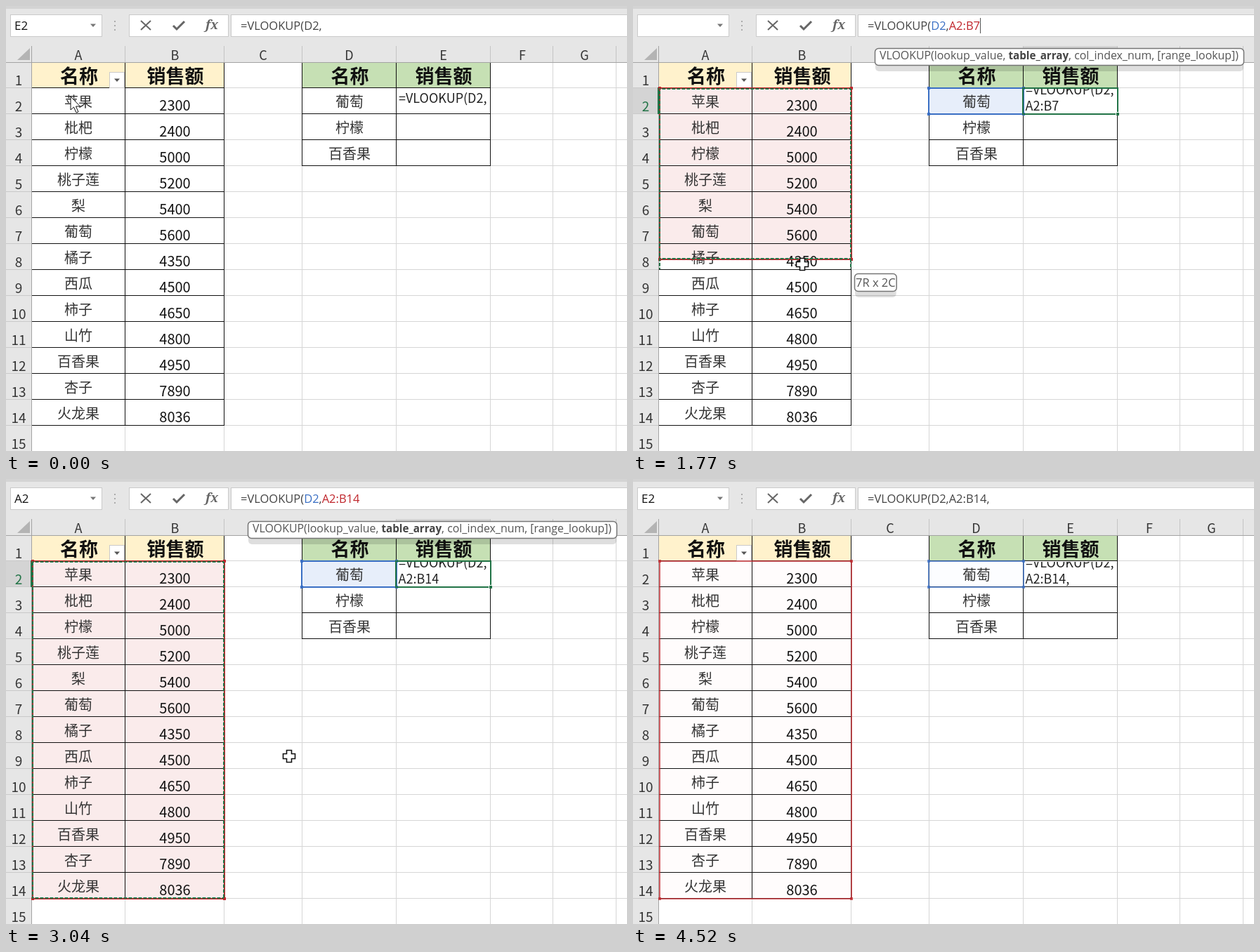
Animation of 884x634 px, one loop 4560 ms. Source, as an HTML page with a canvas:

```html
<!DOCTYPE html>
<html lang="zh">
<head>
<meta charset="utf-8">
<style>
html, body { margin: 0; width: 100%; height: 100%; overflow: hidden; background: #fff; }
canvas { display: block; }
</style>
</head>
<body>
<canvas id="stage" width="884" height="634"></canvas>
<script>
const c = document.getElementById('stage').getContext('2d');
const LOOP = 4560, FOCUS = 300, CLICK = 1000, DRAG = 1460, RELEASE = 2600, COMMA = 3660, BLUR = 4330;
const GREEN = '#217346', RED = '#c0272d', BLUE = '#3a6fc4';
const cjk = '"Noto Sans CJK SC", "Noto Sans CJK", sans-serif';
const ui = '"Open Sans", "Noto Sans", sans-serif';
const colX = [36, 169, 310, 421, 555, 689, 778, 868];
const rowY = r => 79 + 37 * (r - 1);
const fruits = '苹果 枇杷 柠檬 桃子莲 梨 葡萄 橘子 西瓜 柿子 山竹 百香果 杏子 火龙果'.split(' ');
const sales = [2300, 2400, 5000, 5200, 5400, 5600, 4350, 4500, 4650, 4800, 4950, 7890, 8036];

// Pointer path: time, x, y
const path = [
  [0, 92, 129], [50, 92, 129], [90, 112, 131], [DRAG, 112, 131], [1580, 172, 222],
  [1713, 238, 338], [1770, 241, 368], [2060, 244, 488], [2150, 245, 511], [2350, 245, 576],
  [RELEASE, 245, 580], [3000, 403, 395], [3090, 403, 395], [3500, 450, 382],
  [3920, 450, 382], [4280, 520, 665], [LOOP, 520, 665]
];

const clamp = v => Math.max(0, Math.min(1, v));

function pointer(t) {
  let i = 0;
  while (i < path.length - 2 && t >= path[i + 1][0]) i++;
  const [t0, x0, y0] = path[i], [t1, x1, y1] = path[i + 1];
  const k = clamp((t - t0) / (t1 - t0));
  return [x0 + (x1 - x0) * k, y0 + (y1 - y0) * k];
}

// Selected cell under the pointer: last column and row
function picked(t) {
  const [x, y] = pointer(Math.max(DRAG, Math.min(t, RELEASE)));
  return { col: x > 169 ? 2 : 1, row: Math.max(2, Math.min(14, Math.floor((y - rowY(1)) / 37) + 1)) };
}

// The drawn edge trails the picked cell by a short moving average
function edge(t) {
  let x = 0, y = 0;
  for (let i = 0; i < 20; i++) {
    const p = picked(t - i * 5);
    x += colX[p.col] / 20;
    y += rowY(p.row + 1) / 20;
  }
  return [Math.round(x), Math.round(y)];
}

function box(x, y, w, h, fill) {
  c.fillStyle = fill;
  c.fillRect(x, y, w, h);
}
const hLine = (x0, x1, y, color) => box(x0, y, x1 - x0 + 1, 1, color);
const vLine = (x, y0, y1, color) => box(x, y0, 1, y1 - y0 + 1, color);

function text(s, x, y, font, color, align = 'left') {
  c.font = font;
  c.fillStyle = color;
  c.textAlign = align;
  c.fillText(s, x, y);
  return x + c.measureText(s).width;
}

function stroke(points, color, width, close) {
  c.beginPath();
  points.forEach(([x, y]) => c.lineTo(x, y));
  if (close) c.closePath();
  c.strokeStyle = color;
  c.lineWidth = width;
  c.stroke();
}

function shape(points, fill) {
  c.beginPath();
  points.forEach(([x, y]) => c.lineTo(x, y));
  c.closePath();
  c.fillStyle = fill;
  c.fill();
}

function withAlpha(a, draw) {
  c.save();
  c.globalAlpha = a;
  draw();
  c.restore();
}

function frameBox(x, y, w, h) {
  box(x, y, w, h, '#fff');
  c.strokeStyle = '#cacaca';
  c.lineWidth = 1;
  c.strokeRect(x + .5, y + .5, w, h);
}

function rangeName(t) {
  if (t < CLICK) return '';
  const p = picked(t - 70);
  return p.col < 2 && p.row < 3 ? 'A2' : 'A2:' + 'AB'[p.col - 1] + p.row;
}

function topBar(t, focused) {
  box(0, 0, 884, 80, '#e6e6e6');
  box(0, 0, 884, 4, '#d4d4d4');
  frameBox(6, 12, 130, 31);
  frameBox(175, 12, 141, 31);
  frameBox(320, 12, 570, 31);
  shape([[120, 25.5], [128, 25.5], [124, 30]], '#777');
  for (const y of [21, 27, 33]) box(154, y, 2, 2, '#aaa');
  stroke([[192, 21], [206, 34]], '#666', 2);
  stroke([[206, 21], [192, 34]], '#666', 2);
  stroke([[238, 28], [243, 33], [254, 22]], '#666', 3);
  text('fx', 284, 33, 'italic bold 18px "Noto Serif", serif', '#666');

  const p = picked(t);
  const dragging = t > DRAG && t < RELEASE && (p.col > 1 || p.row > 2);
  const name = t < CLICK || t >= COMMA ? 'E2' : dragging ? '' : 'A2';
  text(name, 12, 34, '17px ' + ui, '#111');

  const font = '16.5px ' + ui, dark = '#444';
  let x = text('=VLOOKUP(', 334, 34, font, dark);
  x = text('D2', x, 34, font, focused ? BLUE : dark);
  x = text(',', x, 34, font, dark);
  x = text(rangeName(t), x, 34, font, focused ? RED : dark);
  if (t >= COMMA) text(',', x, 34, font, dark);
  if (focused && t < COMMA - 100 && (t + 820) % 1060 < 530) vLine(Math.round(x), 17, 38, '#555');
}

function headers(focused) {
  box(0, 80, 36, 554, '#e6e6e6');
  if (focused) {
    box(556, 57, 133, 23, '#d4d4d4');
    box(0, 117, 36, 36, '#d4d4d4');
  }
  shape([[34, 60], [34, 77], [16, 77]], '#b4b4b4');
  [103, 240.5, 366, 488.5, 622.5, 735, 823.5].forEach((x, i) =>
    text('ABCDEFG'[i], x, 77, '18px ' + cjk, '#333', 'center'));
  colX.forEach(x => vLine(x, 57, 80, '#c4c4c4'));
  for (let r = 1; r <= 15; r++) {
    hLine(0, 36, rowY(r + 1), '#c9c9c9');
    text(r, 18, rowY(r) + 34, '19px ' + cjk, focused && r === 2 ? GREEN : '#333', 'center');
  }
  hLine(0, 884, 80, '#a3a3a3');
  vLine(36, 57, 634, '#a3a3a3');
  if (focused) box(35, 116, 2, 38, GREEN);
}

function grid() {
  colX.slice(1).forEach(x => vLine(x, 81, 634, '#d6d6d6'));
  for (let r = 2; r <= 16; r++) hLine(37, 884, rowY(r), '#d6d6d6');
}

function tables(t) {
  box(37, 81, 273, 35, '#fff2cc');
  box(422, 81, 267, 35, '#c6e0b4');
  for (let r = 2; r <= 15; r++) hLine(37, 310, rowY(r), '#111');
  for (const x of [169, 310]) vLine(x, 81, rowY(15), '#111');
  for (let r = 2; r <= 5; r++) hLine(421, 689, rowY(r), '#111');
  for (const x of [421, 555, 689]) vLine(x, 81, rowY(5), '#111');

  for (const [s, x] of [['名称', 104], ['销售额', 241], ['名称', 489.5], ['销售额', 623]])
    text(s, x, 110, 'bold 27px ' + cjk, '#111', 'center');
  const small = '300 20px ' + cjk;
  fruits.forEach((s, i) => {
    text(s, 103, 144 + 37 * i, small, '#333', 'center');
    text(sales[i], 240.5, 149 + 37 * i, small, '#111', 'center');
  });
  ['葡萄', '柠檬', '百香果'].forEach((s, i) => text(s, 489, 144 + 37 * i, small, '#333', 'center'));

  frameBox(147, 94, 21, 22);
  shape([[154, 103.5], [162, 103.5], [158, 108]], '#555');

  c.save();
  c.beginPath();
  c.rect(556, 118, 133, 35);
  c.clip();
  const font = '18px ' + cjk;
  text('=VLOOKUP(D2,', 559, t < CLICK ? 138 : 126, font, '#222');
  if (t >= CLICK) text(rangeName(t) + (t >= COMMA ? ',' : ''), 558.5, 149, font, '#222');
  c.restore();
}

function outline(x0, y0, x1, y1, color) {
  c.strokeStyle = color;
  c.lineWidth = 2;
  c.strokeRect(x0, y0, x1 - x0, y1 - y0);
  for (const x of [x0, x1]) for (const y of [y0, y1]) box(x - 2, y - 2, 4, 4, color);
}

// Marching dashes; the sides already reach the picked row
function ants(t, x1, y1) {
  const bottom = rowY(picked(t).row + 1);
  const sides = [[[38, bottom], [38, 118]], [[37, 118], [x1, 118]],
    [[x1, 118], [x1, bottom]], [[x1, y1], [37, y1]]];
  c.save();
  c.setLineDash([5, 2]);
  c.lineDashOffset = -t / 45;
  sides.forEach(side => stroke(side, GREEN, 2));
  c.restore();
}

function bubble(x, y, w, h) {
  c.beginPath();
  c.roundRect(x + 1, y + 8, w - 2, h, 5);
  c.fillStyle = 'rgba(0,0,0,.13)';
  c.fill();
  c.beginPath();
  c.roundRect(x + .5, y + .5, w - 1, h - 1, 5);
  c.fillStyle = '#fff';
  c.fill();
  c.strokeStyle = '#767676';
  c.lineWidth = 1.5;
  c.stroke();
}

function hint(t) {
  const late = t >= COMMA;
  bubble(344, 60, late ? 530 : 526, 25);
  let x = 351;
  ['VLOOKUP(lookup_value, ', 'table_array', ', ', 'col_index_num', ', [range_lookup])'].forEach((s, i) => {
    const bold = i === (late ? 3 : 1);
    x = text(s, x, 76, (bold ? 'bold 15.2px ' : '15.9px ') + ui, bold ? '#444' : '#555');
  });
}

function sizeLabel(t) {
  const p = picked(t);
  if (t < DRAG || t >= RELEASE || (p.col < 2 && p.row < 3)) return;
  const s = `${p.row - 1}R x ${p.col}C`, x = colX[p.col] + 5, y = rowY(p.row + 1) + 6;
  c.font = '16.5px ' + ui;
  bubble(x, y, c.measureText(s).width + 4, 26);
  text(s, x + 2, y + 19, '16.5px ' + ui, '#555');
}

function cursor(t) {
  const [x, y] = pointer(t);
  c.save();
  c.translate(Math.round(x), Math.round(y));
  let pts;
  if (t < FOCUS)
    pts = [[0, 0], [0, 19], [4.5, 15], [8, 23], [11, 22], [7.5, 14], [13.5, 14]];
  else {
    const a = 3.5, b = 8.5;
    pts = [[-a, -b], [a, -b], [a, -a], [b, -a], [b, a], [a, a], [a, b], [-a, b], [-a, a], [-b, a], [-b, -a], [-a, -a]];
  }
  shape(pts, '#fff');
  stroke(pts, '#111', t < FOCUS ? 1 : 1.6, true);
  c.restore();
}

function draw(t) {
  const focused = t >= FOCUS && t < BLUR;
  const fade = (inMs, outMs) => Math.min(clamp((t - FOCUS) / inMs), 1 - clamp((t - BLUR) / outMs));
  const fill = fade(200, 225), line = fade(120, 700), tip = fade(150, 170);
  const [x1, y1] = edge(t);

  box(0, 0, 884, 634, '#fff');
  grid();
  withAlpha(fill, () => {
    box(422, 117, 133, 36, '#e7eefa');
    if (t >= CLICK) box(37, 117, x1 - 37, y1 - 117, '#faebeb');
  });
  tables(t);
  topBar(t, focused);
  headers(focused);

  withAlpha(line, () => {
    outline(421, 117, 556, 154, BLUE);
    if (t >= CLICK) outline(38, 117, x1 + 1, y1 + 1, RED);
  });
  if (t >= CLICK && t < COMMA) ants(t, x1, y1);
  if (focused) {
    c.strokeStyle = GREEN;
    c.lineWidth = 2;
    c.strokeRect(555, 117, 135, 37);
    box(687, 151, 5, 5, '#fff');
    box(688, 152, 4, 4, GREEN);
  }
  withAlpha(tip, () => hint(t));
  sizeLabel(t);
  cursor(t);
}

function tick(now) {
  draw(now % LOOP);
  requestAnimationFrame(tick);
}
requestAnimationFrame(tick);
</script>
</body>
</html>
```
